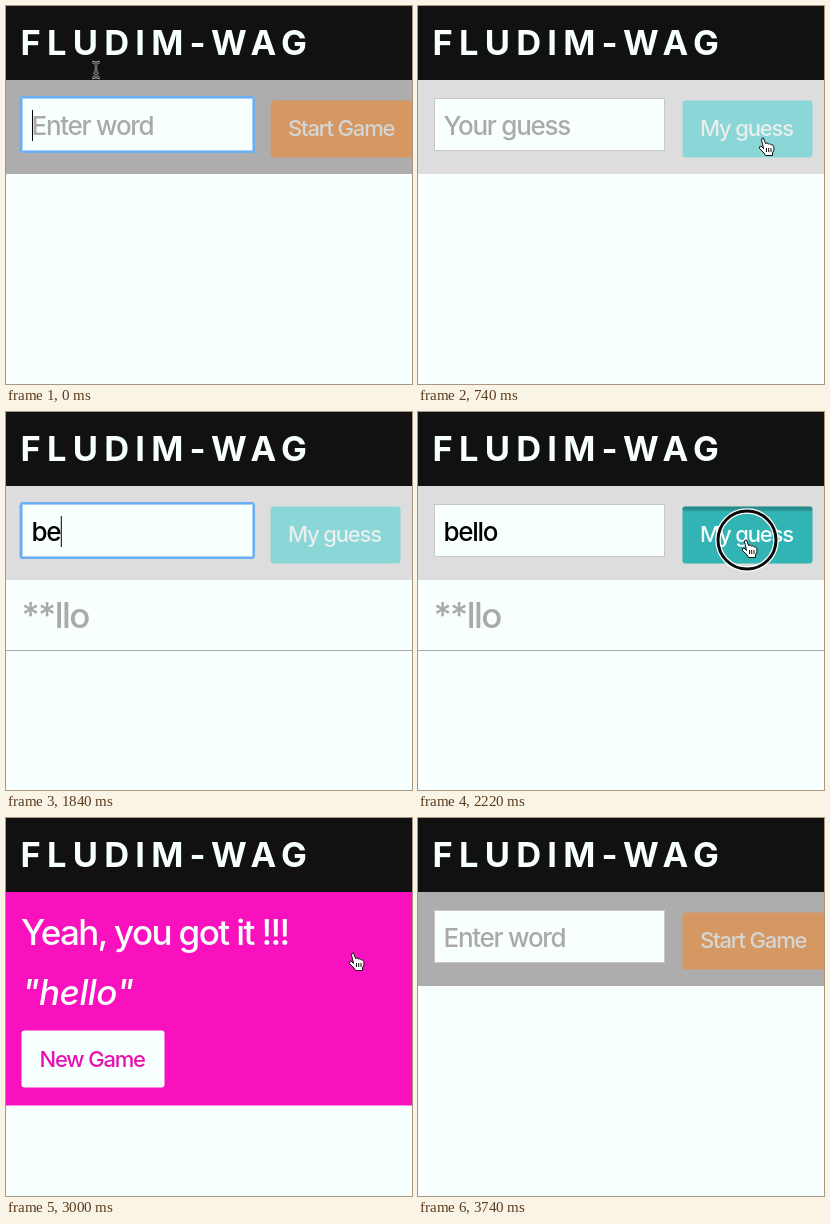
An HTML page for the animation above (3.9 s loop, 406 by 378 pixels).

```html
<!DOCTYPE html>
<html lang="en">
<head>
<meta charset="utf-8">
<title>Word guessing game</title>
<style>
  html, body { margin: 0; width: 100%; height: 100%; overflow: hidden; background: #f8ffff; }
  svg { display: block; width: 100%; height: 100%; }
  text { font-family: Inter, Roboto, sans-serif; font-weight: 450; letter-spacing: -.046em; }
  .title { font-size: 34.5px; font-weight: 650; letter-spacing: .18em; fill: #f8ffff; }
  .field { font-size: 26px; letter-spacing: -.049em; }
  .label { font-size: 22px; font-weight: 550; letter-spacing: -.053em; fill: #f8ffff; }
  .new { font-size: 22px; letter-spacing: -.053em; fill: #e812b0; }
  .big { font-size: 35px; }
  .big text { font-weight: 500; }
  .big .word { font-style: italic; letter-spacing: -.012em; }
</style>
</head>
<body>
<svg viewBox="0 0 406 378" preserveAspectRatio="xMinYMin meet">
  <defs>
    <linearGradient id="inset" x2="0" y2="1">
      <stop offset="0" stop-opacity=".25"/>
      <stop offset=".6" stop-opacity=".2"/>
      <stop offset="1" stop-opacity="0"/>
    </linearGradient>
  </defs>
  <rect width="406" height="378" fill="#f8ffff"/>
  <rect width="406" height="74" fill="#111"/>
  <text class="title" x="14.5" y="49">FLUDIM-WAG</text>

  <g id="form">
    <rect id="bar" y="74" width="406" height="94"/>
    <rect id="ring" x="15" y="91.5" width="232.5" height="54" rx="2" fill="none" stroke="#6aaff5" stroke-width="3"/>
    <rect id="box" x="16.5" y="92.5" width="230" height="52" fill="#f8ffff"/>
    <text id="value" class="field" x="25.5" y="129"></text>
    <rect id="caret" y="104" width="1" height="31"/>
    <g id="button">
      <rect id="face" x="264.5" y="94.5" height="57" rx="3"/>
      <rect id="shade" x="264.5" y="94.5" height="57" rx="3"/>
      <rect id="lip" x="264.5" y="94.5" height="5.5" rx="2" fill="url(#inset)"/>
      <text id="label" class="label" x="282" y="130"></text>
    </g>
  </g>

  <g id="rows" class="big" fill="#aaa">
    <g><text x="15.5" y="216">**llo</text><rect y="238" width="406" height="1"/></g>
    <g><text x="15.5" y="287">*ello</text><rect y="309" width="406" height="1"/></g>
  </g>

  <g id="win">
    <rect y="74" width="406" height="213.500" fill="#fa11be"/>
    <g class="big" fill="#f8ffff">
      <text x="15" y="127">Yeah, you got it !!!</text>
      <text class="word" x="16" y="187">"hello"</text>
    </g>
    <rect x="15.5" y="212.5" width="143" height="57" rx="3" fill="#f8ffff"/>
    <rect id="winShade" x="15.5" y="212.5" width="143" height="57" rx="3"/>
    <text class="new" x="33.5" y="249">New Game</text>
  </g>

  <g id="mouse">
    <g id="click" fill="none">
      <circle r="29" stroke="#fff" stroke-width="5.5"/>
      <circle r="29" stroke="#0b0b0b" stroke-width="3"/>
    </g>
    <g id="hand" stroke="#111" stroke-linejoin="round">
      <path fill="#fff" d="M-1 8L-2.500 2Q-2.500-.5-.5 0L1.500 5.500Q3 4 4.500 6Q6 4.800 7.300 7Q9 6 9.800 8.500L10 12L8.500 15V17.500H1.500L0 15L-4.500 10.500Q-5 8-3 8L-.5 10.500Z"/>
      <path fill="none" d="M2.500 10V14M4.700 10V14M7 10V14"/>
    </g>
    <g id="beam" fill="none">
      <path d="M-4-8Q0-8 0-5Q0-8 4-8M0-5V5M-4 8Q0 8 0 5Q0 8 4 8M-2.500 3H2.500" stroke="#aaa" stroke-width="2.5"/>
      <path d="M-4-8Q0-8 0-5Q0-8 4-8M0-5V5M-4 8Q0 8 0 5Q0 8 4 8M-2.500 3H2.500" stroke="#222"/>
    </g>
  </g>
</svg>
<script>
const LOOP = 3900;
const GUESS = 640, ROW_1 = 1560, ROW_2 = 2280, WIN = 2980, RESTART = 3500;

const el = id => document.getElementById(id);
const show = (node, on) => node.setAttribute('display', on ? 'inline' : 'none');
const set = (id, attrs) => {
  for (const name in attrs) el(id).setAttribute(name, attrs[name]);
};

const entries = [
  { text: 'hello', key: 40, step: 40, focus: 0, blur: 560, end: GUESS },
  { text: 'world', key: 1140, step: 40, focus: 940, blur: 1480, end: ROW_1 },
  { text: 'bello', key: 1760, step: 80, focus: 1680, blur: 2220, end: ROW_2 },
  { text: 'hello', key: 2500, step: 50, focus: 2420, blur: 2900, end: WIN },
  { text: '', key: LOOP, step: 1, focus: LOOP, blur: LOOP, end: LOOP }
];

// time, x, y
const path = [
  [0, 90, 64], [260, 90, 64], [480, 346, 132], [780, 346, 132],
  [920, 140, 118], [1380, 140, 118], [1480, 340, 132], [1580, 340, 132],
  [1660, 150, 118], [2100, 150, 118], [2200, 329, 128], [2300, 329, 128],
  [2400, 150, 118], [2840, 150, 118], [2900, 348, 135], [3020, 348, 135],
  [3360, 90, 240]
];

// from, to
const presses = [[560, GUESS], [940, 1020], [1480, ROW_1], [1680, 1740],
  [2220, ROW_2], [2420, 2480], [2900, WIN], [3420, RESTART]];
const hidden = [[40, 260], [1140, 1380], [1760, 2100], [2500, 2840], [3560, LOOP]];
const within = (t, spans) => spans.some(([a, b]) => t >= a && t < b);

function mouseAt(t) {
  const i = path.findIndex(p => p[0] > t);
  if (i < 0) return path[path.length - 1].slice(1);
  const [t0, x0, y0] = path[i - 1], [t1, x1, y1] = path[i];
  const u = (t - t0) / (t1 - t0), e = u * u * (3 - 2 * u);
  return [x0 + (x1 - x0) * e, y0 + (y1 - y0) * e];
}

function drawForm(t, hover, pressed) {
  const start = t < GUESS || t >= RESTART;
  const entry = entries.find(e => t < e.end);
  const count = Math.max(0, Math.floor((t - entry.key) / entry.step) + 1);
  const typed = entry.text.slice(0, count);
  const focused = t >= entry.focus && t < entry.blur;
  const ready = typed.length >= (start ? 1 : 5);
  const width = start ? 144 : 130;

  set('bar', { fill: start ? '#adadad' : '#ddd' });
  show(el('ring'), focused);
  set('box', { stroke: focused ? '#a9d0f5' : '#c8c8c8' });
  el('value').textContent = typed || (start ? 'Enter word' : 'Your guess');
  set('value', { fill: typed ? '#000' : '#aaa' });
  show(el('caret'), focused);
  set('caret', { x: typed ? 26 + el('value').getComputedTextLength() : 26 });

  set('button', { opacity: ready ? 1 : .5 });
  set('face', { width, fill: start ? '#ff851b' : '#3bd0d0' });
  set('shade', { width, opacity: !ready || !hover ? 0 : pressed ? .135 : .0625 });
  set('lip', { width });
  show(el('lip'), ready && hover && pressed);
  el('label').textContent = start ? 'Start Game' : 'My guess';
}

function draw(t) {
  const won = t >= WIN && t < RESTART;
  const [x, y] = mouseAt(t);
  const visible = !within(t, hidden);
  const pressed = within(t, presses);
  const hover = visible && x > 265 && y > 95 && y < 151;

  show(el('form'), !won);
  show(el('win'), won);
  if (!won) drawForm(t, hover, pressed);
  const overNew = x > 16 && x < 158 && y > 213;
  set('winShade', { opacity: overNew ? (pressed ? .125 : .0625) : 0 });

  const [first, second] = el('rows').children;
  show(first, t >= ROW_1 && t < WIN);
  show(second, t >= ROW_2 && t < WIN);

  const hand = hover || t >= WIN;
  show(el('mouse'), visible);
  set('mouse', { transform: `translate(${x} ${y})` });
  show(el('click'), pressed);
  show(el('hand'), hand);
  show(el('beam'), !hand);
}

const begin = performance.now();
function tick() {
  draw((performance.now() - begin) % LOOP);
  requestAnimationFrame(tick);
}
tick();
</script>
</body>
</html>
```
